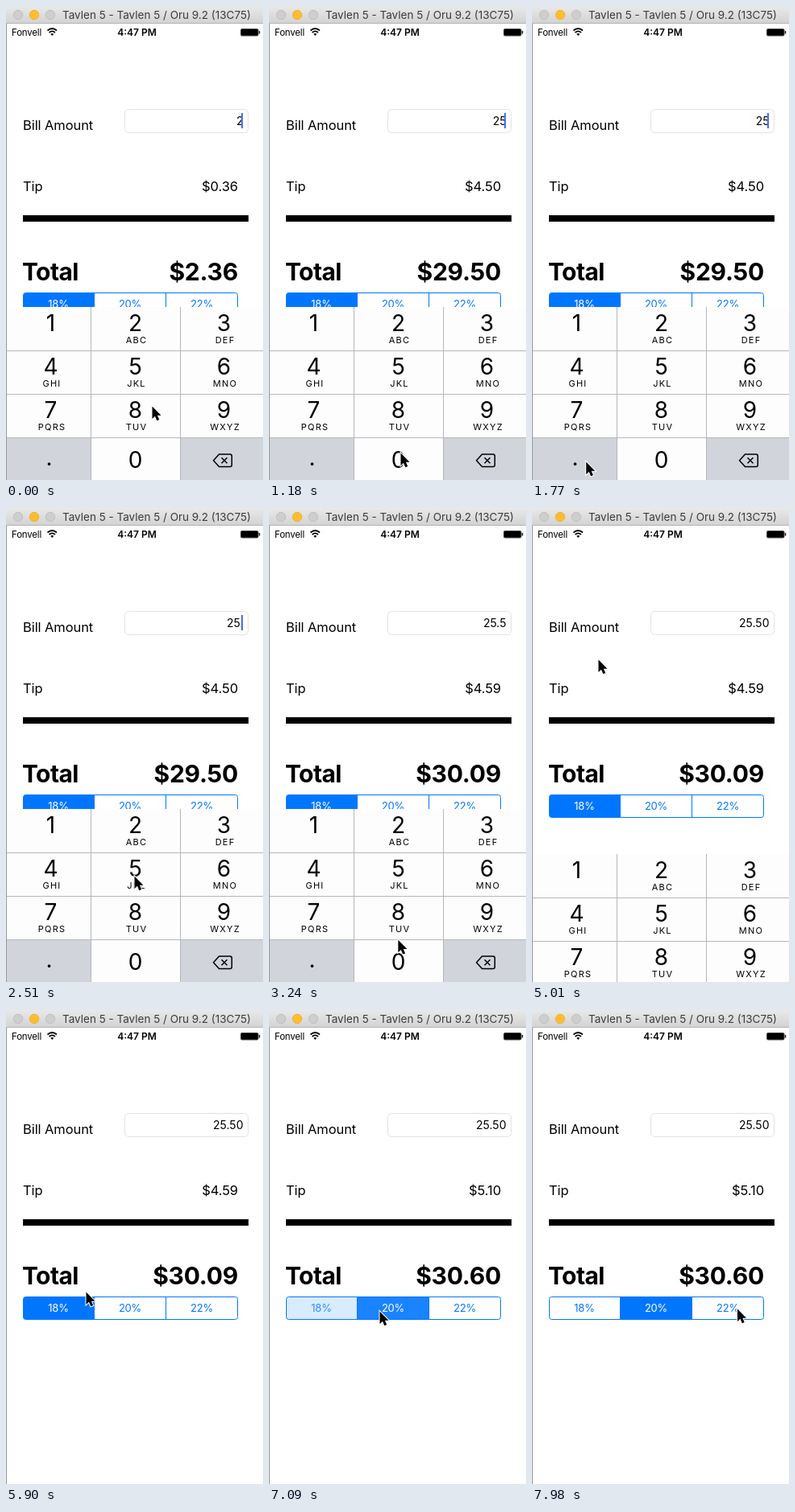
Animation, 319 px wide and 589 px high, one loop 8000 ms. Source, as an HTML page:

```html
<!DOCTYPE html>
<html lang="en">
<head>
<meta charset="utf-8">
<title>Tip calculator</title>
<style>
html, body { margin: 0; height: 100%; overflow: hidden; background: #fff }
svg { display: block; font-family: Inter, sans-serif }
.end { text-anchor: end }
.mid { text-anchor: middle }
.label { font-size: 16.5px; letter-spacing: -.005em }
.total { font-size: 30px; font-weight: 700; letter-spacing: -.02em }
.total.end { letter-spacing: -.008em }
.seg { font-size: 13px; letter-spacing: -.02em }
.digit { font-size: 28px }
.letters { font-size: 11px; letter-spacing: .11em }
</style>
</head>
<body>
<svg width="319" height="589" viewBox="0 0 319 589">
  <defs>
    <linearGradient id="bar" x2="0" y2="1">
      <stop stop-color="#e9e9e9"/><stop offset="1" stop-color="#d2d2d2"/>
    </linearGradient>
  </defs>
  <rect width="319" height="589" fill="#fff"/>
  <path d="M.5 22V589" stroke="#999"/>
  <rect width="319" height="22" fill="url(#bar)"/>
  <path d="M0 21.5H319" stroke="#b4b4b4"/>
  <g fill="#cecece" stroke="#c0c0c0">
    <circle cx="15" cy="11" r="5.7"/>
    <circle cx="35" cy="11" r="5.7" fill="#fdbe2f" stroke="#f0b02d"/>
    <circle cx="55" cy="11" r="5.7"/>
  </g>
  <text x="70" y="16" font-size="13.5" fill="#3c3c3c">Tavlen 5 - Tavlen 5 / Oru 9.2 (13C75)</text>

  <text x="7" y="37" font-size="11.5" letter-spacing="-.2">Fonvell</text>
  <g fill="none" stroke="#000" stroke-width="1.7">
    <path d="M51.5 30.5Q57.3 25.5 63 30.5M53.6 33Q57.3 29.7 61 33"/>
    <path d="M57.3 37L55.3 34.8Q57.3 33.2 59.3 34.8Z" fill="#000" stroke="none"/>
  </g>
  <text class="mid" x="162.5" y="37" font-size="12" font-weight="600">4:47 PM</text>
  <rect x="291.5" y="28.5" width="21.5" height="8.5" rx="1.5" stroke="#444"/>
  <rect x="313.8" y="31" width="1.5" height="3.5" fill="#222"/>

  <text class="label" x="21" y="153.5">Bill Amount</text>
  <rect x="147.5" y="128.5" width="153" height="29" rx="5" fill="#fff" stroke="#e2e2e2"/>
  <text id="bill" class="end" x="294.5" y="147.5" font-size="14"></text>
  <rect id="caret" x="292" y="133" width="2" height="19" fill="#4a6cf0"/>
  <text class="label" x="21" y="229.5">Tip</text>
  <text id="tip" class="label end" x="288" y="229.5"></text>
  <path d="M21 264H301" stroke="#000" stroke-width="8"/>
  <text class="total" x="20" y="341">Total</text>
  <text id="total" class="total end" x="288" y="341"></text>
  <g id="segments"></g>
  <g id="keyboard"></g>
  <path id="cursor" d="M.5 .5V16L4 12.800 6.300 18.300 9.200 17.100 6.900 11.800H11.500Z"
    stroke="#fff" stroke-width="2" paint-order="stroke"/>
</svg>
<script>
const $ = id => document.getElementById(id);
const BLUE = '#0076ff', GRAY = '#d1d4da';
const LOOP = 8000, STEP = 147.5;

const rates = [18, 20, 22];
const segX = [22, 110, 199, 287];
const roundLeft = 'M109.5 356.5H24.5Q21.5 356.5 21.5 359.5V381.5Q21.5 384.5 24.5 384.5H109.5Z';
$('segments').innerHTML = rates.map((rate, i) =>
  (i ? `<rect id="seg${i}" x="${segX[i]}" y="357" width="${segX[i + 1] - segX[i]}" height="27"/>`
     : `<path id="seg0" d="${roundLeft}"/>`) +
  `<text id="rate${i}" class="seg mid" x="${65 + 89 * i}" y="375">${rate}%</text>`).join('') +
  `<rect x="21.5" y="356.5" width="266" height="28" rx="3" fill="none" stroke="${BLUE}"/>
   <path d="M109.5 357V384M198.5 357V384" stroke="${BLUE}"/>`;

const colX = [1, 106, 217, 319], mid = [56, 161, 271];
const keys = ['1', '2ABC', '3DEF', '4GHI', '5JKL', '6MNO', '7PQRS', '8TUV', '9WXYZ', '.', '0', ''];
$('keyboard').innerHTML = keys.map((key, i) => {
  const col = i % 3, row = Math.floor(i / 3), x = mid[col], y = 374 + 54 * row;
  const digitX = key === '.' ? 53.5 : x - .5;
  const baseline = y + (row < 3 ? 30 : key === '.' ? 35 : 38);
  return `<rect id="key${i}" x="${colX[col]}" y="${y}" width="${colX[col + 1] - colX[col]}" height="54"/>
    <text class="digit mid" x="${digitX}" y="${baseline}">${key.slice(0, 1)}</text>
    <text class="letters mid" x="${x + 1}" y="${y + 45}">${key.slice(1)}</text>`;
}).join('') +
  `<path d="M1 428.5H319M1 482.5H319M1 536.5H319M105.5 374V589M216.5 374V589" stroke="#b5b7ba"/>
   <path d="M264.5 557H278Q280.3 557 280.3 559.3V570.2Q280.3 572.5 278 572.5H264.5L257.5 564.8ZM267.5 561.3L274.5 568.3M274.5 561.3L267.5 568.3"
     fill="none" stroke="#000" stroke-width="1.5" stroke-linejoin="round"/>`;

// Pointer stops: step, x, y
const stops = [
  [0, 181, 497], [2, 164, 455], [5, 163, 455], [8, 163, 555], [11, 67, 566], [14, 66, 566],
  [17, 159, 457], [19, 159, 457], [23, 160, 551], [24, 160, 551], [25, 160, 558], [27, 160, 558],
  [32, 82, 188], [37, 82, 188], [40, 99, 350], [44, 137, 374], [50, 137, 374], [54, 254.5, 371]
];
// Typing: step, entry
const typed = [[0, '2'], [5, '25'], [14, '25.'], [19, '25.5'], [26, '25.50']];
const between = (k, a, b) => k >= a && k < b;
const ease = p => { p = Math.min(1, Math.max(0, p)); return p * p * (3 - 2 * p); };
const money = value => '$' + value.toFixed(2);

function pointer(k) {
  const i = Math.max(1, stops.findIndex(s => s[0] >= k));
  const [k0, x0, y0] = stops[i - 1], [k1, x1, y1] = stops[i];
  const p = ease((k - k0) / (k1 - k0));
  return [x0 + (x1 - x0) * p, y0 + (y1 - y0) * p];
}

function paintSegment(i, fill, color) {
  $('seg' + i).setAttribute('fill', fill);
  $('rate' + i).setAttribute('fill', color);
}

function draw(now) {
  // The screen refreshes in discrete steps
  const k = Math.min(54, Math.floor((now % LOOP + 10) / STEP));
  const entry = typed.filter(e => e[0] <= k).pop()[1];
  const tip = entry * (k < 48 ? .18 : .2);
  $('bill').textContent = entry;
  $('tip').textContent = money(tip);
  $('total').textContent = money(+entry + tip);

  const caretOff = between(k, 2, 5) || between(k, 22, 25) || k >= 31;
  $('caret').setAttribute('visibility', caretOff ? 'hidden' : 'visible');

  paintSegment(0, k < 48 ? BLUE : k < 49 ? '#d9ebff' : '#fff', k < 48 ? '#fff' : k < 49 ? '#2b8fff' : BLUE);
  paintSegment(1, k < 46 ? '#fff' : k < 48 ? '#d9ebff' : k < 49 ? '#1a83ff' : BLUE, k < 48 ? BLUE : '#fff');
  paintSegment(2, '#fff', BLUE);

  const pressed = k === 13 ? 9 : k === 18 ? 4 : k === 25 ? 10 : -1;
  keys.forEach((_, i) => {
    const gray = (i === 9 || i === 11) !== (i === pressed);
    $('key' + i).setAttribute('fill', gray ? GRAY : '#fdfdfd');
  });
  $('keyboard').setAttribute('transform', `translate(0 ${216 * ease((k - 33) / 3)})`);
  $('cursor').setAttribute('transform', `translate(${pointer(k)})`);
}

function frame() {
  draw(performance.now());
  requestAnimationFrame(frame);
}
frame();
</script>
</body>
</html>
```
